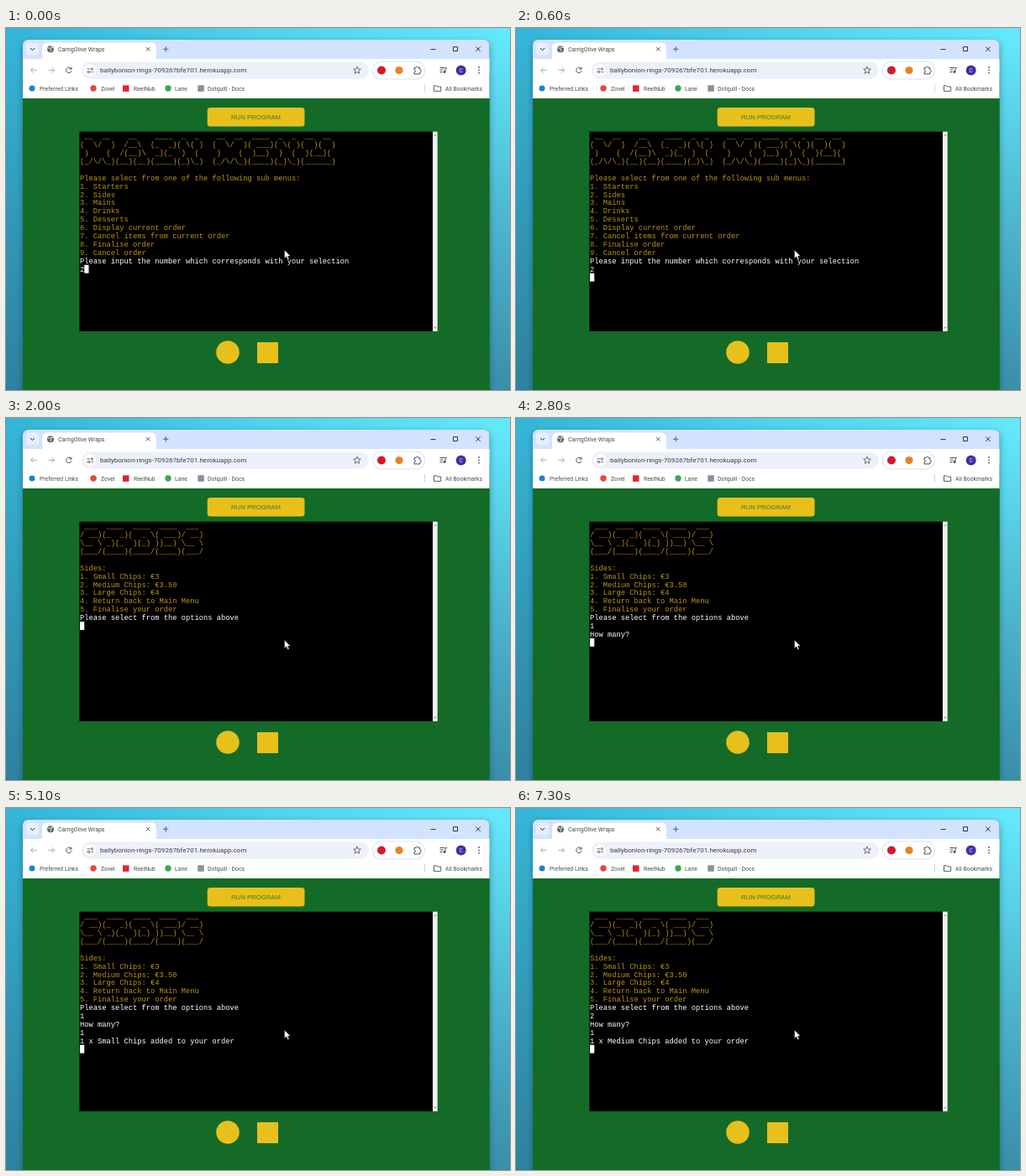
Write an HTML page with a canvas that moves like this. It is 600x432 px and loops after 8 s.

```html
<!DOCTYPE html>
<html lang="en">
<head>
<meta charset="utf-8">
<title>Terminal menu</title>
<style>
html, body { margin: 0; width: 100%; height: 100%; overflow: hidden; }
canvas { display: block; width: 600px; height: 432px; }
</style>
</head>
<body>
<canvas id="stage" width="600" height="432"></canvas>
<script>
const ctx = document.getElementById('stage').getContext('2d');
const LOOP = 8000;
const UI = 'Roboto, sans-serif';
const MONO = '"Liberation Mono", monospace';
const GOLD = '#e8c01c', GREEN = '#146a27', INK = '#4a4d51';
const CELL_W = 5.25, CELL_H = 238 / 24, TERM_X = 88, TERM_Y = 124;

const screens = {
  menu: {
    body: String.raw` __  __    __    ____  _  _    __  __  ____  _  _  __  __
(  \/  )  /__\  (_  _)( \( )  (  \/  )( ___)( \( )(  )(  )
 )    (  /(__)\  _)(_  )  (    )    (  )__)  )  (  )(__)(
(_/\/\_)(__)(__)(____)(_)\_)  (_/\/\_)(____)(_)\_)(______)

Please select from one of the following sub menus:
1. Starters
2. Sides
3. Mains
4. Drinks
5. Desserts
6. Display current order
7. Cancel items from current order
8. Finalise order
9. Cancel order`,
    prompt: 'Please input the number which corresponds with your selection'
  },
  sides: {
    body: String.raw` ___  ____  ____  ____  ___
/ __)(_  _)(  _ \( ___)/ __)
\__ \ _)(_  )(_) ))__) \__ \
(___/(____)(____/(____)(___/

Sides:
1. Small Chips: €3
2. Medium Chips: €3.50
3. Large Chips: €4
4. Return back to Main Menu
5. Finalise your order`,
    prompt: 'Please select from the options above'
  }
};

// Start time, screen, and everything entered or printed after its prompt.
const steps = [
  [0, 'menu', '2'],
  [200, 'menu', '2\n'],
  [1000, 'sides', ''],
  [2700, 'sides', '1'],
  [2800, 'sides', '1\nHow many?\n'],
  [3000, 'sides', '1\nHow many?\n1'],
  [3200, 'sides', '1\nHow many?\n1\n'],
  [3300, 'sides', '1\nHow many?\n1\n1 x Small Chips added to your order\n'],
  [5700, 'sides', ''],
  [6000, 'sides', '2\n'],
  [6400, 'sides', '2\nHow many?\n1'],
  [7200, 'sides', '2\nHow many?\n1\n'],
  [7300, 'sides', '2\nHow many?\n1\n1 x Medium Chips added to your order\n']
];

function rect(x, y, w, h, fill) {
  ctx.fillStyle = fill;
  ctx.fillRect(x, y, w, h);
}

function round(x, y, w, h, r, fill) {
  ctx.beginPath();
  ctx.roundRect(x, y, w, h, r);
  ctx.fillStyle = fill;
  ctx.fill();
}

function disc(x, y, r, fill) {
  ctx.beginPath();
  ctx.arc(x, y, r, 0, Math.PI * 2);
  ctx.fillStyle = fill;
  ctx.fill();
}

function stroke(path, color = INK, width = 1) {
  ctx.strokeStyle = color;
  ctx.lineWidth = width;
  ctx.stroke(new Path2D(path));
}

function text(str, x, y, size, color, family = UI) {
  ctx.font = `${size}px ${family}`;
  ctx.fillStyle = color;
  ctx.fillText(str, x, y);
}

function gradient(x0, y0, x1, y1, ...colors) {
  const g = ctx.createLinearGradient(x0, y0, x1, y1);
  colors.forEach((c, i) => g.addColorStop(i / (colors.length - 1), c));
  return g;
}

function drawDesktop() {
  rect(0, 0, 600, 432, gradient(0, 0, 600, 0, '#35b4d6', '#4fd2ec', '#64e8fc'));
  rect(0, 0, 600, 432, gradient(0, 14, 0, 432, '#2c708c00', '#2c708c66', '#2c708cc0'));
  ctx.save();
  ctx.shadowColor = 'rgba(0, 40, 60, .4)';
  ctx.shadowBlur = 8;
  ctx.shadowOffsetY = 3;
  round(20, 14, 555.5, 440, 6, GREEN);
  ctx.restore();
}

function drawTabs() {
  round(20, 14, 555.5, 40, [6, 6, 0, 0], '#d3e3fd');
  round(24, 17.5, 15, 15, 4, '#e6effd');
  stroke('M29 24 l2.5 2.5 l2.5 -2.5', '#202124');
  round(43, 17.5, 136, 26, [6, 6, 0, 0], '#fff');
  disc(53, 25.2, 4, '#5f6368');
  stroke('M49.5 24 h3 l1.5 2 l-1.5 2.4 M54 21.7 v1.8 h2.5', '#fff', .9);
  text('CarrigOlive Wraps', 62, 27.8, 7, '#45484c');
  stroke('M167 23 l4.4 4.4 m0 -4.4 l-4.4 4.4', INK, .9);
  stroke('M187 25.2 h6.4 m-3.2 -3.2 v6.4', INK, .9);
  stroke('M505.5 25.5 h6 M532.5 22.5 h5 v5 h-5 z M559.3 22.5 l5.4 5.4 m0 -5.4 l-5.4 5.4', '#202124', .9);
}

function drawToolbar() {
  rect(20, 37, 555.5, 47, '#fff');
  stroke('M36.5 50.3 h-7 m3 -3 l-3 3 l3 3', '#a6a9ad');
  stroke('M50.5 50.3 h7 m-3 -3 l3 3 l-3 3', '#a6a9ad');
  stroke('M77.3 48.2 A3.2 3.2 0 1 0 78 51.2 M78 46.6 v2.5 h-2.5');

  round(90, 40.5, 342, 20, 10, '#edf0f8');
  disc(100, 50.5, 7, '#fff');
  stroke('M96.5 48.8 h3.2 M101.6 52.4 h2.4 M96 52.4 h1.3', INK, .9);
  stroke('M103.4 48.8 a1.1 1.1 0 1 0 -2.2 0 a1.1 1.1 0 1 0 2.2 0 M100 52.4 a1.1 1.1 0 1 0 -2.2 0 a1.1 1.1 0 1 0 2.2 0', INK, .9);
  text('ballybonion-rings-709267bfe701.herokuapp.com', 112, 53.3, 8.1, '#3a3d41');
  stroke('M418 46 l1.2 2.9 l3.1 .2 l-2.4 2 l.8 3.1 l-2.7 -1.7 l-2.7 1.7 l.8 -3.1 l-2.4 -2 l3.1 -.2 z', INK, .8);

  round(436, 39.5, 63, 22, 11, '#d7e4fb');
  round(437, 40.5, 61, 20, 10, '#fff');
  disc(447, 50.5, 5, '#d7182a');
  disc(468, 50.5, 4.6, '#e88324');
  stroke('M486 47.5 h2 a1.4 1.4 0 0 1 2.8 0 h2 v2.4 a1.4 1.4 0 0 1 0 2.8 v2.2 h-6.8 v-2.2 a1.4 1.4 0 0 0 0 -2.8 z');

  stroke('M516.5 47.5 h5.5 M516.5 50 h4 M516.5 52.5 h3 M523 52.5 v-5 h2');
  disc(522, 52.5, 1.4, INK);
  disc(541.7, 50.4, 6, '#3f2fa6');
  text('C', 539.6, 52.8, 6.5, '#ddd9f4');
  for (const y of [47, 50.3, 53.6]) disc(563, y, .9, INK);
}

function drawBookmarks() {
  disc(31, 72, 3.5, '#1684d8');
  disc(104, 72, 3.7, '#de4a3b');
  round(139, 68.4, 7.5, 7.5, 0, '#e8212b');
  disc(193, 72, 3.7, '#3aa757');
  round(228.3, 68.3, 7.5, 7.5, 0, '#8b9096');
  const labels = [['Preferred Links', 40], ['Zovel', 113], ['ReelNub', 152],
    ['Lane', 201], ['Dotquill - Docs', 240], ['All Bookmarks', 523]];
  for (const [label, x] of labels) text(label, x, 74.5, 6.85, '#484b4f');
  rect(498, 67, 1, 10, '#c8d8f2');
  stroke('M509.5 68.8 h3 l1 1.2 h4.2 v5.4 h-8.2 z', INK, .9);
}

function drawPage() {
  rect(20, 84, 555.5, 348, GREEN);
  round(239.7, 95, 115.8, 22.5, 3.5, GOLD);
  text('RUN PROGRAM', 268, 109.2, 7.75, '#4a7420', '"Liberation Sans", Arial, sans-serif');
  rect(87.4, 123.7, 420.6, 238.2, '#000');
  rect(508, 123.7, 5.7, 238.2, '#f1f1f0');
  stroke('M509.7 129 l1.3 -1.5 l1.3 1.5 M509.7 356.7 l1.3 1.5 l1.3 -1.5', '#777', .8);
  disc(264, 387, 13.8, GOLD);
  rect(299, 375, 25, 25, GOLD);
}

function drawTerminal(time) {
  const [, name, output] = steps.findLast(step => step[0] <= time);
  const { body, prompt } = screens[name];
  const bodyLines = body.split('\n');
  const lines = [...bodyLines, prompt, ...output.split('\n')];
  lines.forEach((line, row) => {
    const color = row < bodyLines.length ? '#be9219' : '#fff';
    text(line, TERM_X, TERM_Y + row * CELL_H + 8.1, 8.75, color, MONO);
  });
  const row = lines.length - 1;
  rect(TERM_X + lines[row].length * CELL_W, TERM_Y + row * CELL_H, CELL_W, CELL_H, '#fff');
}

function drawPointer() {
  const arrow = new Path2D('M331.5 264.9 v10 l2.3 -2.1 l1.6 3.6 l1.7 -.7 l-1.6 -3.5 h3.2 z');
  ctx.fillStyle = '#fff';
  ctx.fill(arrow);
  ctx.strokeStyle = '#111';
  ctx.lineWidth = .5;
  ctx.stroke(arrow);
}

function frame(now) {
  drawDesktop();
  drawTabs();
  drawToolbar();
  drawBookmarks();
  drawPage();
  drawTerminal(now % LOOP);
  drawPointer();
  requestAnimationFrame(frame);
}

requestAnimationFrame(frame);
</script>
</body>
</html>
```
